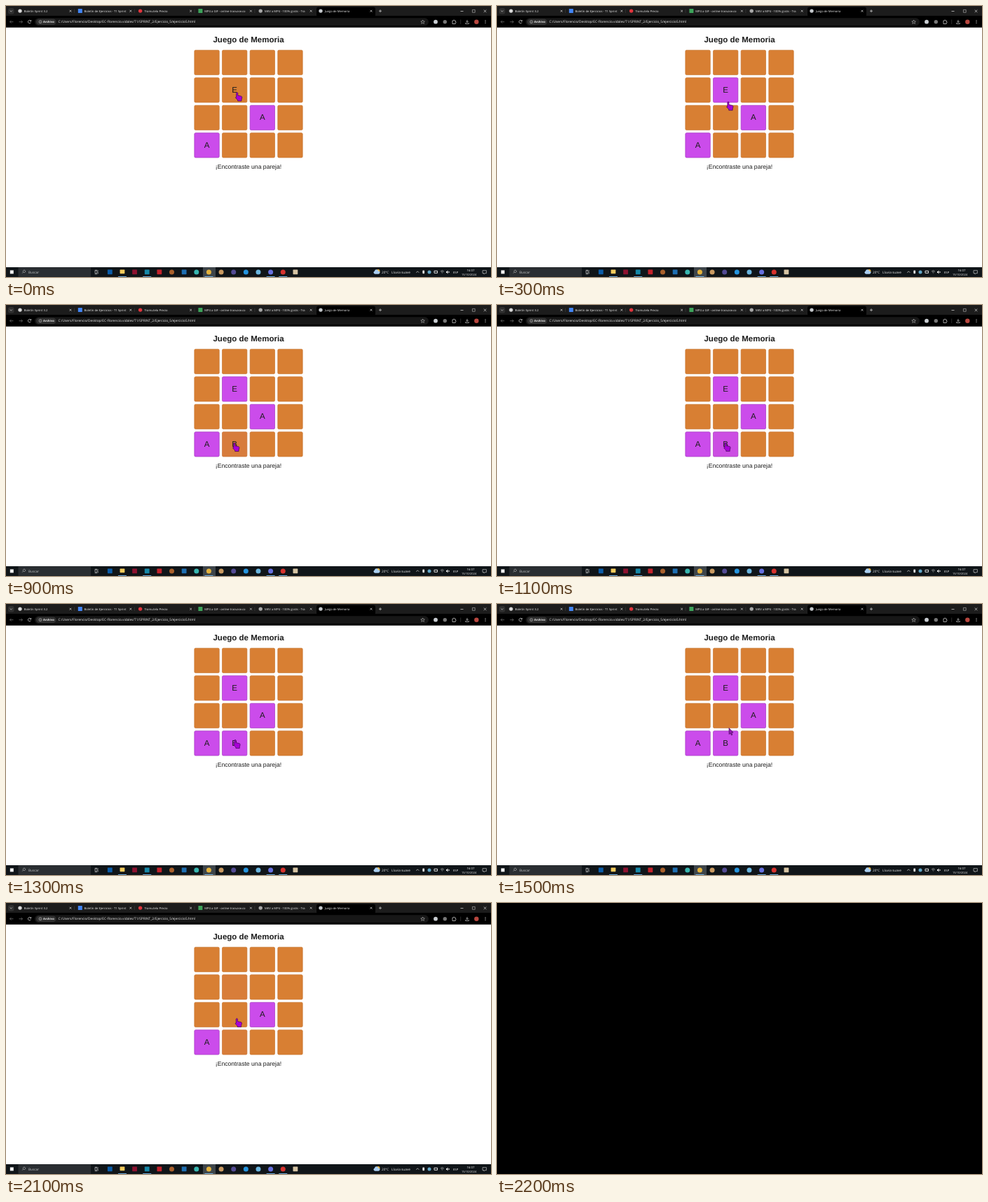
These frames come from a looping animation (692 px wide and 388 px high, 2.3 s). An HTML page:

```html
<!DOCTYPE html>
<html lang="es">
<head>
<meta charset="utf-8">
<title>Juego de Memoria</title>
<style>
  html, body { margin: 0; width: 100%; height: 100%; overflow: hidden; background: #fff; }
  svg { display: block; width: 692px; height: 388px; text-rendering: geometricPrecision; }
  .ui { font-family: "Open Sans", "Noto Sans", sans-serif; }
  .page { font-family: "Liberation Sans", Arial, sans-serif; text-anchor: middle; fill: #1c1c1c; }
</style>
</head>
<body>
<svg id="stage" viewBox="0 0 692 388" xmlns="http://www.w3.org/2000/svg"></svg>
<script>
const stage = document.getElementById('stage');
const LOOP = 2300, STEP = 100, FADE = 300;
const ORANGE = [216, 127, 51], PURPLE = [203, 76, 235];

function add(tag, attrs, parent = stage, content = '') {
  const node = document.createElementNS('http://www.w3.org/2000/svg', tag);
  for (const key in attrs) node.setAttribute(key, attrs[key]);
  node.textContent = content;
  return parent.appendChild(node);
}
const rect = (x, y, width, height, fill, rx = 0) => add('rect', { x, y, width, height, fill, rx });
const dot = (cx, cy, r, fill) => add('circle', { cx, cy, r, fill });
const line = (d, stroke = '#ddd', width = 0.7) =>
  add('path', { d, stroke, fill: 'none', 'stroke-width': width });
const label = (x, y, size, text, fill = '#eee', weight = 400) =>
  add('text', { x, y, 'font-size': size, fill, 'font-weight': weight, class: 'ui' }, stage, text);
const cross = (x, y, r) => line(`M${x - r} ${y - r}l${2 * r} ${2 * r}m0 ${-2 * r}l${-2 * r} ${2 * r}`);

function drawTabs() {
  rect(0, 0, 692, 15, '#1c1c1c');
  rect(0, 14, 692, 16.8, '#000');
  rect(443, 1.5, 84, 14, '#000', 3);
  rect(3, 3, 8.5, 8.5, '#303030', 2.5);
  line('M5.7 6.5l1.6 1.6 1.6-1.6');
  const tabs = [
    ['Boletín Sprint 3.2', '#d8d8d8', 0],
    ['Boletín de Ejercicios - T1 Sprint', '#4285f4', 1],
    ['Tramutelo Precio', '#e0343c', 0],
    ['MP4 a GIF - online-trasvase.co', '#3da35a', 1],
    ['MKV a MP4 - 100% gratis - Tra', '#a8a8a8', 0],
    ['Juego de Memoria', '#c4c8cc', 0]
  ];
  tabs.forEach(([title, color, square], i) => {
    const x = 20 + i * 85.8;
    if (square) rect(x - 3, 4, 6, 6, color, 0.6);
    else dot(x, 7.1, 2.7, color);
    label(x + 5.8, 8.8, 4.2, title);
    cross(x + 72, 7.2, 1.4);
    if (i < 4) line(`M${x + 77.5} 4.5v5.5`, '#555', 0.4);
  });
  line('M532 7.2h4m-2-2v4');
  line('M648.5 7.5h4');
  line('M665.4 5.4h3.8v3.8h-3.8z', '#ddd', 0.5);
  cross(683.5, 7.3, 1.8);
}

function drawToolbar() {
  line('M10.5 22.7h-5m2-2l-2 2 2 2', '#777');
  line('M18.5 22.7h5m-2-2l2 2-2 2', '#777');
  line('M35.4 21.3a2.2 2.2 0 1 0 .2 2.3m.2-3.6v1.8h-1.8');
  rect(41, 17.3, 562, 10.8, '#171717', 5.4);
  rect(43, 18.4, 28.5, 8.6, '#303030', 4.3);
  line('M47 22.7a2 2 0 1 0 4 0a2 2 0 1 0-4 0m2-.4v1.5m0-2.4v.4', '#ddd', 0.5);
  label(53, 24.3, 4.2, 'Archivo', '#eee', 700);
  label(74.6, 24.4, 4.78,
    'C:/Users/Florencio/Desktop/EC-Florencio.vidales/T1/SPRINT_2/Ejercicio_5/ejercicio5.html');
  add('path', { d: 'M594.6 20l.8 1.8 2 .2-1.5 1.3.5 2-1.8-1.1-1.8 1.1.5-2-1.5-1.3 2-.2z',
    fill: 'none', stroke: '#ddd', 'stroke-width': 0.5 });
  dot(613, 22.7, 2.9, '#c9cdd2');
  dot(626.3, 22.7, 2.7, '#777');
  line('M637 21h1.2a.9.9 0 0 1 1.8 0h1.2v1.4a.9.9 0 0 1 0 1.8v1.3h-4.2z');
  line('M648.7 19.5v6.5', '#555', 0.5);
  line('M658 20v3.6m-1.6-1.6l1.6 1.6 1.6-1.6m-4 2.2v1.2h4.8v-1.2');
  dot(671.3, 22.7, 3.2, '#b8473f');
  for (let i = -1; i < 2; i++) dot(684, 22.7 + i * 1.8, 0.55, '#ddd');
}

function drawTaskbar() {
  rect(0, 374, 692, 14, '#101519');
  rect(5.8, 378.4, 5, 5, '#f2f2f2');
  rect(17.5, 374.3, 103.5, 13.4, '#2a2e32');
  line('M23.2 382.6l1.5-1.6a1.7 1.7 0 1 1 .5.4', '#ccc', 0.6);
  label(32, 382.8, 4.75, 'Buscar', '#c4c6c8');
  line('M127 379h3v3.6h-3zm4.3-.4v1.6m0 .9v2.2m-4.6-5h3.6m-3.6 5.5h3.6', '#ddd', 0.6);
  rect(281, 374, 18, 14, '#3e454a');

  const apps = ['#0b5ca8', '#f4cb5d', '#8d1230', '#1688a8', '#c3222b', '#a9602c', '#1f6fb2', '#38b6b0',
    '#e3b23c', '#c99a62', '#544b94', '#2594de', '#6ab5df', '#6670df', '#d7322e', '#d5c3a3'];
  const square = new Set([0, 1, 2, 3, 4, 6, 15]);
  apps.forEach((color, i) => {
    const x = 148.3 + i * 17.64;
    if (square.has(i)) rect(x - 3.4, 377.6, 6.8, i === 1 ? 5.6 : 6.6, color, 0.6);
    else dot(x, 380.9, 3.5, color);
  });
  for (const i of [1, 3, 8, 13, 14]) rect(142.3 + i * 17.64, 387.1, 12, 0.9, '#76b9ed');

  dot(531, 379.6, 2.5, '#e8b84a');
  rect(524.5, 379.5, 9, 4.2, '#a9cdf0', 2.1);
  dot(528.5, 379.8, 2.5, '#a9cdf0');
  label(536, 382.6, 4.7, '20°C');
  label(550, 382.6, 4.75, 'Lluvia suave');
  line('M585.3 381.8l2-2 2 2');
  rect(594.3, 378.6, 2.8, 4.6, '#ddd', 1);
  dot(604, 381, 2.5, '#63a7c8');
  line('M611 379.3h4.5v3h-4.5z', '#ddd', 1);
  line('M620 380a3.3 3.3 0 0 1 4.8 0m-3.8 1.3a2 2 0 0 1 2.8 0m-1.4 1.2v.6', '#ddd', 0.6);
  add('path', { d: 'M628 380h1l1.5-1.4v4.8l-1.5-1.4h-1z', fill: '#ddd' });
  cross(632, 381, 0.8);
  label(638, 382.6, 4.2, 'ESP');
  label(657.4, 379.9, 4.3, '16:07');
  label(650, 386.2, 4, '15/10/2024');
  line('M680 378.7h5.4v4h-2.2l-1.2 1.2v-1.2h-2z', '#ddd', 0.6);
}

const mix = (a, b, k) => `rgb(${a.map((v, i) => Math.round(v + (b[i] - v) * k))})`;
const cards = [];

function drawBoard() {
  rect(0, 30.8, 692, 343.2, '#fff');
  add('text', { x: 346, y: 52, 'font-size': 11.53, 'font-weight': 700, class: 'page' }, stage, 'Juego de Memoria');
  const letters = { 5: 'E', 10: 'A', 12: 'A', 13: 'B' };
  for (let i = 0; i < 16; i++) {
    const x = 268.5 + (i % 4) * 39.64, y = 62.9 + Math.floor(i / 4) * 39.5;
    const face = add('rect', { x: x + 0.35, y: y + 0.35, width: 35.4, height: 35.3, rx: 1.6, 'stroke-width': 0.7 });
    const text = add('text', { x: x + 18.05, y: y + 21.2, 'font-size': 11.53, class: 'page' }, stage, letters[i] || '');
    cards.push({ face, text });
  }
  add('text', { x: 346, y: 232.6, 'font-size': 8.65, class: 'page' }, stage, '¡Encontraste una pareja!');
}

function paintCard(i, amount, showLetter) {
  const { face, text } = cards[i];
  face.setAttribute('fill', mix(ORANGE, PURPLE, amount));
  face.setAttribute('stroke', mix([200, 116, 46], [164, 55, 192], amount));
  text.setAttribute('visibility', showLetter ? 'visible' : 'hidden');
}

// CSS "ease": cubic-bezier(.25, .1, .25, 1)
function ease(p) {
  if (p <= 0) return 0;
  if (p >= 1) return 1;
  const curve = (s, a, b) => 3 * a * s * (1 - s) ** 2 + 3 * b * s * s * (1 - s) + s ** 3;
  let low = 0, high = 1;
  for (let n = 0; n < 20; n++) {
    const mid = (low + high) / 2;
    if (curve(mid, 0.25, 0.25) < p) low = mid; else high = mid;
  }
  return curve(low, 0.1, 1);
}

drawBoard();
drawTabs();
drawToolbar();
drawTaskbar();

const style = { fill: '#a900d8', stroke: '#3c0752', 'stroke-width': 0.7, 'stroke-linejoin': 'round' };
const hand = add('path', { ...style,
  d: 'M-1 1.1Q0 -.5 1.1 1V4.6L6 5.7Q7.3 6.1 7.1 7.6L6.3 10.6V12.5H.9V11L-2 8.2Q-2.6 6.8-1 7.2Z' });
const arrow = add('path', { ...style, fill: '#9a18b4', d: 'M0 0L6 6.4 3.5 6.6 4.8 9.6 3.4 10.2 2.1 7.2 .2 8.9Z' });
const blackout = rect(0, 0, 692, 388, '#000');

// time, x, y of the pointer tip
const path = [
  [0, 329.7, 123.5], [200, 329.7, 123.5], [400, 330, 150], [600, 329.8, 175.6], [700, 328.5, 182],
  [800, 326.5, 193], [900, 325.8, 197], [1200, 326, 196.8], [1300, 327, 194], [1400, 329, 186],
  [1500, 331, 177.6], [1600, 329.8, 169], [1700, 329.3, 164.9], [LOOP, 329.3, 164.9]
];

function pointerAt(t) {
  const i = path.findIndex(p => p[0] > t);
  const [t0, x0, y0] = path[i - 1], [t1, x1, y1] = path[i];
  const k = (t - t0) / (t1 - t0);
  return [x0 + (x1 - x0) * k, y0 + (y1 - y0) * k];
}

function render(time) {
  const t = Math.floor((time % LOOP) / STEP) * STEP;
  const fade = start => ease((t - start) / FADE);
  const hide = fade(1870);
  const shown = t < 1900;
  cards.forEach((_, i) => paintCard(i, i === 10 || i === 12 ? 1 : 0, true));
  paintCard(5, fade(0) - hide, shown);
  paintCard(13, fade(880) - hide, shown && t >= 900);

  const [x, y] = pointerAt(t);
  const inGap = t === 1500;
  for (const [shape, visible] of [[hand, !inGap], [arrow, inGap]]) {
    shape.setAttribute('transform', `translate(${x} ${y})`);
    shape.setAttribute('visibility', visible ? 'visible' : 'hidden');
  }
  blackout.setAttribute('visibility', t >= 2200 ? 'visible' : 'hidden');
}

const begin = performance.now();
function tick() {
  render(performance.now() - begin);
  requestAnimationFrame(tick);
}
render(0);
requestAnimationFrame(tick);
</script>
</body>
</html>
```
